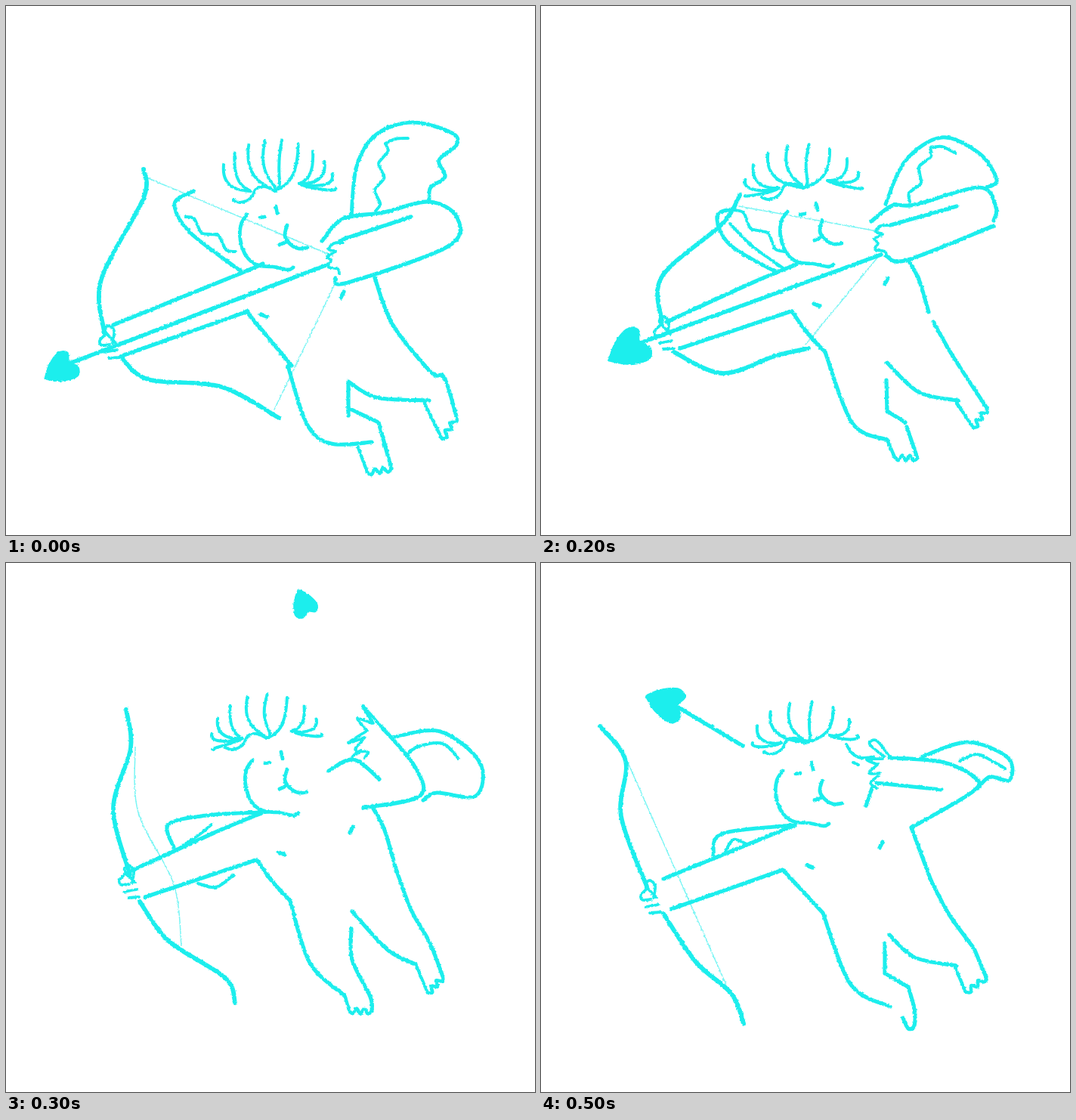
An HTML page for the animation above (600 ms loop, 700 by 700 pixels).

```html
<!DOCTYPE html>
<html lang="en">
<head>
<meta charset="utf-8">
<title>Cupid</title>
<style>
html, body { margin: 0; width: 100%; height: 100%; overflow: hidden; background: #fff; }
svg { display: block; width: 100vw; height: 100vh; }
.pose { fill: none; stroke: #1feeed; stroke-linecap: round; stroke-linejoin: round; opacity: 0; animation: show .6s step-end infinite; }
.tip { fill: #1feeed; }
.string { opacity: .6; }
@keyframes show { 0% { opacity: 1; } 16.6667%, 100% { opacity: 0; } }
</style>
</head>
<body>
<svg id="stage" viewBox="0 0 700 700">
  <filter id="crayon" filterUnits="userSpaceOnUse" x="0" y="0" width="700" height="700">
    <feTurbulence type="fractalNoise" baseFrequency=".3" numOctaves="2" seed="4"/>
    <feDisplacementMap in="SourceGraphic" scale="3" xChannelSelector="R" yChannelSelector="G"/>
  </filter>
</svg>
<script>
const weight = { wing: 5, feather: 4, hair: 4, head: 4.8, arm: 5.2, hand: 3.8,
  body: 5.2, foot: 4.4, bow: 5.8, string: 1.5, shaft: 5.4, tip: 3 };
const stage = document.getElementById('stage');
let group, count = 0;

function add(parent, tag, attrs) {
  const el = document.createElementNS('http://www.w3.org/2000/svg', tag);
  for (const k in attrs) el.setAttribute(k, attrs[k]);
  return parent.appendChild(el);
}

const path = (part, d) => add(group, 'path', { class: part, d, 'stroke-width': weight[part] });

// Smooth curve through points
function curve(p) {
  let d = 'M' + p[0];
  for (let i = 0; i < p.length - 1; i++) {
    const a = p[i - 1] || p[i], b = p[i], c = p[i + 1], e = p[i + 2] || c;
    const c1 = b.map((v, k) => v + (c[k] - a[k]) / 6);
    const c2 = c.map((v, k) => v - (e[k] - b[k]) / 6);
    d += `C${c1} ${c2} ${c}`;
  }
  return d;
}

// Strokes are "x,y x,y ..." joined by ";"
function line(part, text, dx = 0, dy = 0) {
  const strokes = text.split(';').map(s => s.split(' ').map(q => {
    const [x, y] = q.split(',').map(Number);
    return [x + dx, y + dy];
  }));
  path(part, strokes.map(curve).join(''));
}

// Wavy feather edge with n half waves
function ripple(ax, ay, bx, by, n) {
  const dx = bx - ax, dy = by - ay, len = Math.hypot(dx, dy), pts = [];
  for (let i = 0; i <= n * 2; i++) {
    const t = i / n / 2, w = 5 * Math.sin(t * n * Math.PI) / len;
    pts.push([ax + dx * t + dy * w, ay + dy * t - dx * w]);
  }
  path('feather', curve(pts));
}

// Tufts fan out from a root, over an ellipse, from angle a to b
function hair(x, y, n, a, b, rx, ry) {
  let d = '';
  for (let i = 0; i < n; i++) {
    const t = (a + (b - a) * i / (n - 1)) * Math.PI / 180;
    const ox = rx * Math.cos(t), oy = -ry * Math.sin(t);
    const far = Math.abs(ox) > 48 ? Math.sign(ox) * 32 : 0;
    const tx = x + ox, ty = y + oy, ex = x + far, ey = y - (far > 0 ? 10 : 0);
    const dx = ex - tx, dy = ey - ty;
    const bow = 14 * Math.max(0, 1 - Math.abs(ox) / 45), sag = Math.abs(ox) / 8;
    d += `M${tx} ${ty}C${tx - dx * .12 - bow} ${ty + dy * .75 + sag} ${tx + dx * .75 + bow} ${ty + dy * .85 + sag * .6} ${ex} ${ey}`;
  }
  path('hair', d);
  line('hair', '-55,12 -46,15 -32,9 -25,-3 -13,-6 0,0', x, y);
}

function face(dx, dy, mx, my) {
  line('head', '326,272 318,285 317,305 325,327 340,339 360,341 380,345 387,342', dx, dy);
  line('head', '343,276 349,275;364,261 366,270', dx, dy);
  line('head', '372,284 369,298 376,309 387,315 398,314;362,310 371,306', mx, my);
}

function grip(dx, dy) {
  line('hand', '167,434 169,418 162,411 157,418 171,434;157,423 150,431 153,437 163,436;157,446 173,443;162,454 176,453', dx, dy);
}

function draw(dx, dy) {
  line('hand', '462,290 450,291 443,299 452,302 441,308 446,314 442,322 455,325 457,331', dx, dy);
}

function foot(ax, ay, bx, by, cx, cy) {
  const dx = bx - ax, dy = by - ay, len = Math.hypot(dx, dy), pts = [];
  const side = Math.sign(dy * (ax - cx) - dx * (ay - cy));
  for (let i = 0; i <= 6; i++) {
    const w = i % 6 ? side * (i % 2 ? 4 : -3) / len : 0;
    pts.push([ax + dx * i / 6 + dy * w, ay + dy * i / 6 - dx * w]);
  }
  path('foot', curve(pts) + `L${cx} ${cy}`);
}

function dots(ax, ay, bx, by) {
  line('body', '-4,-1 4,2', ax, ay);
  line('body', '2,-4 -2,4', bx, by);
}

// Heart-shaped point, with a shaft from its notch to the tail
function arrow(x, y, nx, ny, tx, ty) {
  const ux = (nx - x) / 39, uy = (ny - y) / 39;
  const at = (a, c) => [x + ux * a - uy * c, y + uy * a + ux * c];
  path('tip', curve([at(0, 0), at(14, -12), at(33, -20), at(44, -14), at(39, -2),
    at(46, 10), at(38, 20), at(16, 13), at(0, 0)]));
  if (tx) path('shaft', `M${nx} ${ny}L${tx} ${ty}`);
}

function reach(dy) {
  line('arm', '166,418 280,366 338,342;184,453 331,404', 0, dy);
  grip(0, dy);
}

function torso(dy) {
  line('body', '486,336 500,362 513,405;332,404 352,432 376,458', 0, dy);
  dots(365, 395 + dy, 457, 364 + dy);
}

function hang(dy) {
  torso(dy);
  line('body', '514,410 536,470 560,512 578,558;458,472 505,523 542,542;376,458 402,540 446,582;457,495 458,536 482,585 484,604', 0, dy);
  foot(578, 558 + dy, 558, 580 + dy, 542, 542 + dy);
  foot(484, 604 + dy, 454, 603 + dy, 448, 582 + dy);
}

function pose(paint) {
  group = add(stage, 'g', { class: 'pose', filter: 'url(#crayon)', style: `animation-delay:${count++ * 100 - 600}ms` });
  paint();
}

pose(() => {
  line('wing', '457,278 464,212 490,170 538,154 590,168 596,184 573,204 581,226 562,240 560,256;248,245 223,262 244,300 311,351');
  line('feather', '532,175 515,176 502,182');
  ripple(502, 182, 489, 271, 5);
  ripple(237, 279, 303, 325, 4);
  hair(356, 245, 10, 148, 3, 80, 68);
  face(-7, 4, 0, 6);
  line('arm', '142,422 310,354 340,341;156,462 320,404');
  grip(-26, 12);
  line('arm', '418,311 445,282 500,273 560,259 597,280 585,318 452,366 436,360;442,310 536,279');
  draw(-16, 23);
  line('body', '488,360 512,422 562,484 580,492 596,543;453,497 490,518 560,522;318,404 378,476;373,476 398,553 430,579 484,577;453,497 453,542;453,532 493,551;493,551 510,612');
  foot(596, 543, 577, 573, 554, 526);
  foot(510, 612, 478, 617, 466, 584);
  dots(341, 409, 445, 382);
  line('bow', '182,216 182,254 126,362 130,432;152,464 188,494 285,504 361,545');
  line('string', '186,227 433,331;437,364 355,534');
  arrow(52, 493, 84, 473, 426, 342);
});

pose(() => {
  line('wing', '453,263 500,215 555,191 605,215 625,255 606,268;246,364 230,346 270,336 332,337');
  ripple(509, 250, 588, 206, 5);
  line('feather', '250,358 256,352 268,358;272,412 290,422 302,413');
  hair(348, 233, 11, 182, -14, 76, 63);
  face(-6, -7, 1, -4);
  line('arm', '140,409 335,332;161,449 323,390');
  grip(-26, -1);
  line('arm', '428,289 445,268 495,262 550,243 605,264 598,293 460,345 446,326;452,295 547,266');
  draw(-5, 2);
  line('body', '487,344 520,412;522,419 546,460 587,502;456,483 490,506 564,510;315,394 371,460;371,460 398,540 432,567 474,556;456,483 463,537;463,528 486,526;486,526 504,582');
  foot(587, 502, 576, 540, 556, 514);
  foot(504, 582, 481, 587, 466, 562);
  dots(343, 389, 446, 361);
  line('bow', '232,218 212,272 126,350 130,414;158,456 200,475 275,466 346,479');
  line('string', '232,225 440,302;450,346 334,472');
  arrow(65, 467, 100, 449, 440, 325);
});

pose(() => {
  line('wing', '456,262 482,205 530,174 580,195 603,230 590,240;311,352 250,316 233,278 256,268');
  line('feather', '549,195 530,186 515,188;250,288 280,318 322,348');
  ripple(515, 188, 488, 259, 4);
  ripple(256, 270, 322, 325, 4);
  hair(347, 241, 10, 190, 0, 78, 58);
  face(0, 0, 0, 0);
  reach(0);
  line('arm', '437,285 465,264 495,263 580,240 602,266 599,284;599,291 485,336 457,331;462,290 550,265');
  draw(0, 0);
  torso(0);
  line('body', '519,418 546,465 590,532;458,472 500,511 552,522;376,458 412,552 458,574;457,495 458,536;458,536 482,551;484,557 498,598');
  foot(590, 532, 572, 558, 550, 525);
  foot(498, 598, 468, 597, 458, 574);
  line('bow', '263,250 240,288 160,358 160,418;176,458 240,486 310,463 354,453');
  line('string', '262,265 445,298;446,332 350,448');
  arrow(90, 469, 131, 446, 450, 329);
});

pose(() => {
  line('wing', '515,230 575,223 627,264 622,308 570,304 552,314;222,376 215,346 265,334 336,330');
  line('feather', '530,254 545,243 578,239 598,258;234,374 255,360 272,346;254,424 278,429 301,413;458,256 470,248');
  hair(345, 232, 10, 195, 5, 73, 58);
  face(0, -11, 0, -11);
  reach(-11);
  line('arm', '427,275 460,260 494,286;497,217 540,268 548,308 473,324');
  line('hand', '497,217 472,189 486,212;484,212 465,206 478,222;478,222 453,238 474,231;472,234 462,248 479,250 474,258');
  hang(-11);
  line('bow', '159,194 165,245 142,325 164,412;177,448 215,500 290,549 303,582');
  line('string', '171,243 175,330 222,425 232,506');
  arrow(387, 36, 398, 64);
});

pose(() => {
  line('wing', '478,222 515,185 550,177 605,215 598,243 552,254 538,285;326,345 255,315 231,294 318,300');
  line('feather', '322,340 262,311 262,301 285,307 320,321');
  ripple(488, 236, 570, 197, 5);
  hair(347, 237, 10, 198, 0, 66, 58);
  face(0, 0, -1, -4);
  reach(0);
  line('arm', '428,287 460,274 494,296;494,240 538,278 543,320 470,332');
  line('hand', '494,240 495,230 482,242;482,240 476,204 464,236;462,236 451,220 458,208 462,220;456,244 438,246 448,252;448,252 437,264 451,256;454,256 442,270 470,274');
  hang(0);
  line('bow', '136,198 150,240 131,312 162,418;174,456 215,515 278,556 293,592');
  line('string', '150,236 224,350 222,420 280,510 284,570');
  arrow(316, 58, 337, 80, 394, 146);
});

pose(() => {
  line('wing', '505,256 565,237 618,258 620,287 594,283 578,298;228,386 240,358 332,347');
  line('feather', '554,262 576,253 597,262 614,272;244,381 255,366 272,372');
  hair(350, 238, 8, 180, 10, 70, 55);
  line('hair', '404,240 412,252 424,258 440,256;413,264 420,267');
  face(-6, 3, 0, 4);
  line('arm', '162,418 336,347;172,458 320,406');
  grip(-18, 9);
  line('arm', '461,258 530,263 573,283 572,302 492,349;444,291 530,300;438,298 430,321');
  line('hand', '461,256 444,235 435,240 454,256;452,259 431,260 446,267;446,266 434,278 448,278;446,282 436,291 444,298');
  line('body', '490,350 516,420;516,420 540,465 573,510;573,510 589,548;461,492 495,522 550,533;320,406 373,463;373,463 410,558 462,587;455,503 455,543;455,543 486,561;486,561 494,590 494,612 486,616 479,602');
  foot(589, 548, 562, 568, 548, 535);
  dots(356, 401, 450, 373);
  line('bow', '78,216 112,262 106,335 140,428;162,464 205,528 252,570 268,609');
  line('string', '114,262 245,558');
  arrow(139, 176, 180, 190, 267, 242);
});
</script>
</body>
</html>
```
